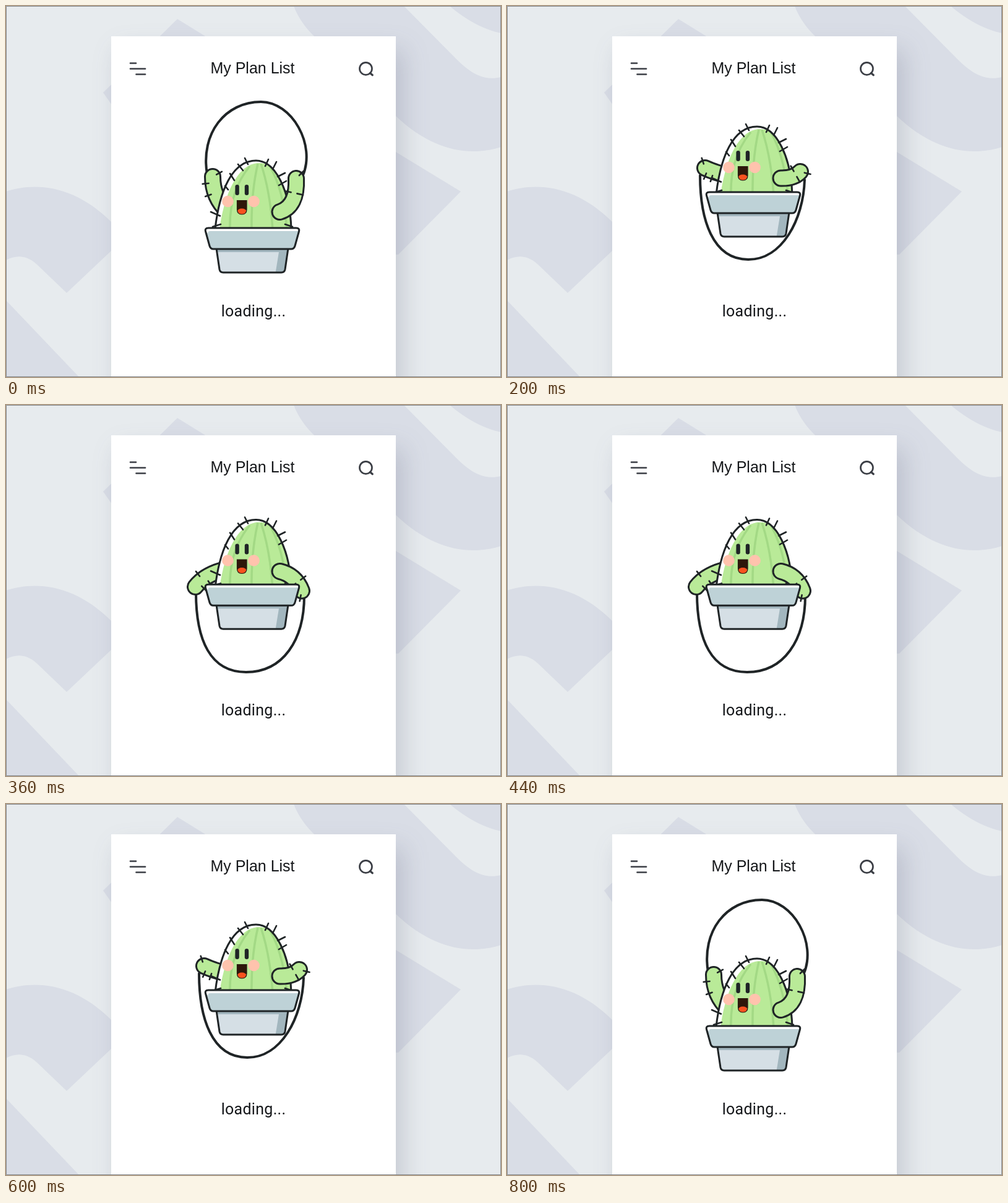
These frames come from a looping animation (800x600 px, 0.84 s). An HTML page:

```html
<!DOCTYPE html>
<html lang="en">
<head>
<meta charset="utf-8">
<title>Loading</title>
<style>
  html, body { margin: 0; width: 100%; height: 100%; overflow: hidden; }
  svg { display: block; width: 800px; height: 600px; background: #e7ebee; }
  .card { fill: #fff; filter: drop-shadow(12px 22px 20px rgba(65, 72, 98, .2)); }
  .line { fill: none; stroke: #1f2426; stroke-width: 3; stroke-linecap: round; stroke-linejoin: round; }
  .spine { stroke-width: 2.6; }
  .rope { stroke-width: 4; }
  .icon { fill: none; stroke: #3b3e45; stroke-width: 2.7; stroke-linecap: round; }
  .limb { fill: none; stroke-linecap: round; }
  .skin { stroke: #b9ea98; stroke-width: 22; }
  .edge { stroke: #1f2426; stroke-width: 28; }
  .rib { fill: none; stroke: #a3d985; stroke-width: 3.5; }
  text { text-anchor: middle; fill: #15171a; }
</style>
</head>
<body>
<svg viewBox="0 0 800 600">
  <defs>
    <clipPath id="bodyClip"><path d="M338 360C345 300 365 250 404 250C436 250 459 300 461 360Z"/></clipPath>
    <clipPath id="baseClip"><path d="M340 392L345 426Q346 431 351 431H445Q450 431 451 426L456 392Z"/></clipPath>
    <clipPath id="mouthClip"><path id="mouthShape" d="M373.5 314.5H389V329Q389 337 381.2 337Q373.5 337 373.5 329Z"/></clipPath>
  </defs>

  <g fill="#d9dde6">
    <path d="M157 140L277 21L340 60V160H171Z"/>
    <path d="M465 0Q475 27 500 51L630 178C690 235 750 244 800 228V115C772 122 750 108 728 86L643 0Z"/>
    <path d="M717 0C738 18 765 36 800 44V0Z"/>
    <path d="M625 233L735 300L634 402H625Z"/>
    <path d="M0 300C50 284 112 291 171 350V395L98 464L50 418C32 402 16 403 0 411Z"/>
    <path d="M0 476L118 600H0Z"/>
  </g>
  <rect class="card" x="170" y="49" width="460" height="600"/>
  <path class="icon" d="M201 92.5H210M201 101.5H225M210.5 110.5H225"/>
  <circle class="icon" cx="581.5" cy="101.3" r="10"/>
  <path class="icon" style="stroke-width:3.2" d="M588.5 108.5L592.3 111.8"/>
  <text x="398.5" y="109" font-size="25" font-family="'Liberation Sans', Arial, sans-serif">My Plan List</text>
  <text x="400" y="501.5" font-size="25" letter-spacing=".3" font-family="Roboto, sans-serif">loading...</text>

  <path id="ropeBack" class="line rope"/>
  <g id="leftArm"></g>

  <g id="body">
    <g clip-path="url(#bodyClip)">
      <path fill="#fff" d="M330 240H470V362H330Z"/>
      <path fill="#b9ea98" d="M345 362C351 312 372 254 409 254C440 254 462 290 470 362Z"/>
      <path class="rib" d="M394 259Q360 300 362 362M407 255Q396 302 397 362M412 255Q427 300 431 362M427 260Q449 300 454 362"/>
    </g>
    <path class="line" d="M338 360C345 300 365 250 404 250C436 250 459 300 461 360"/>
    <path class="line spine" d="M386 246L391 256M375 256L383 266M362 271L369 282M354 291L359 297M331 333L346 339.5M334 357L347 353
      M424 248L419 259M437 252L431 264M451 270L439 276M453 283L441 290M451 353L463 357"/>
    <g fill="#ffc3ad"><circle cx="358.5" cy="316" r="9.3"/><circle cx="400.5" cy="316" r="9.3"/></g>
    <g fill="#1f2426">
      <rect class="eye" x="370.4" width="6.4" rx="3.2"/>
      <rect class="eye" x="385.8" width="6.4" rx="3.2"/>
    </g>
    <use href="#mouthShape" fill="#2e170a"/>
    <ellipse cx="381.2" cy="332.5" rx="7.5" ry="5" fill="#f8521f" clip-path="url(#mouthClip)"/>
    <use href="#mouthShape" fill="none" stroke="#2a1c14" stroke-width="1.2"/>
  </g>

  <g id="rightArm"></g>

  <g id="pot">
    <g clip-path="url(#baseClip)">
      <path fill="#d5dfe5" d="M335 390H460V435H335Z"/>
      <path fill="#a2b6be" d="M335 390H460V435H435L441 398H335Z"/>
    </g>
    <path class="line" d="M340 392L345 426Q346 431 351 431H445Q450 431 451 426L456 392"/>
    <path id="rim" fill="#bed2d7" d="M327 359H469Q475 359 473.5 364.5L467 388Q465.500 393 461 393H335Q330.500 393 329 388L322.500 364.500Q321 359 327 359Z"/>
    <path fill="#fff" d="M325 359.500H471L472 364H330Q326 364 326.500 368L323 364Z"/>
    <use href="#rim" class="line" style="fill-opacity:0"/>
  </g>
  <path id="ropeFront" class="line rope"/>
  <path fill="none" stroke="#85898d" d="M.5 .5H799.500V599.500H.5Z"/>
</svg>
<script>
const LOOP = 840, STEP = 40, JUMP = 800;
const $ = id => document.getElementById(id);

// The jump is symmetric about its peak, so poses cover the rise only.
const TIMES = [0, 120, 200, 280, 360, 440, 520];
const LIFT = [[0, 0], [45.5, 45], [58, 55], [65, 62.5], [68.7, 64.5]]; // pot, body

// tip, control, shoulder, position of the spine at the hand
const LEFT = [
  [334, 276, 334, 310, 358, 332, -.1],
  [327, 248, 334, 278, 360, 294, -.15],
  [320, 262, 335, 269, 360, 275, -.15],
  [312, 279, 325, 269, 356, 266, .1],
  [306, 294, 322, 273, 358, 265, .3]
];
const RIGHT = [
  [469, 279, 471, 324, 442.5, 333, -.15],
  [471, 252, 470, 283, 442.5, 287, 0],
  [474, 268, 464, 279, 442.5, 278.5, -.1],
  [477, 286.5, 465, 271, 442.5, 271, -.15],
  [478, 300.5, 468, 275, 442.5, 269, -.2]
];

// start, control, control x, middle, control x, control, end
const ROPE = [
  [325, 272, 314, 205, 355, 412, 155, 462, 502, 225, 479, 276],
  [321, 250, 325, 310, 355, 398, 353, 440, 474, 318, 476, 252],
  [312, 274, 312, 345, 332, 390, 410, 445, 479, 345, 481, 281],
  [306, 288, 306, 370, 327, 388, 429, 448, 481, 370, 481, 296],
  [307, 303, 307, 380, 330, 388, 432, 448, 482, 380, 482, 308]
];

// Smooth curve through the poses; past the last one they run backwards.
function pose(keys, u) {
  const key = i => keys[i > 4 ? 9 - i : i];
  let i = 0;
  while (u >= TIMES[i + 1]) i++;
  const span = TIMES[i + 1] - TIMES[i], s = (u - TIMES[i]) / span;
  const slope = (j, k) => j
    ? (key(j + 1)[k] - key(j - 1)[k]) / (TIMES[j + 1] - TIMES[j - 1])
    : 1.2 * (key(1)[k] - key(0)[k]) / TIMES[1];
  return key(i).map((a, k) => {
    const b = key(i + 1)[k];
    return a + (b - a) * s * s * (3 - 2 * s)
      + span * s * (1 - s) * (slope(i, k) * (1 - s) - slope(i + 1, k) * s);
  });
}

// A tick across the limb's edge; a negative s goes around the round hand.
function spine([x0, y0, x1, y1, x2, y2], s, side, offset = 12) {
  const q = Math.max(s, 0), p = 1 - q;
  const x = p * p * x0 + 2 * p * q * x1 + q * q * x2;
  const y = p * p * y0 + 2 * p * q * y1 + q * q * y2;
  const along = Math.atan2(p * (y1 - y0) + q * (y2 - y1), p * (x1 - x0) + q * (x2 - x1));
  const angle = along - side * (Math.PI / 2 - Math.min(s, 0) * 5);
  const c = Math.cos(angle), n = Math.sin(angle), a = offset - 5, b = offset + 5;
  return `M${x + a * c} ${y + a * n}L${x + b * c} ${y + b * n}`;
}

function makeArm(id, keys, spines) {
  const group = $(id);
  group.innerHTML = '<path class="limb edge"/><path class="limb skin"/><path class="line spine"/>';
  const [edge, skin, ticks] = group.children;
  return u => {
    const p = pose(keys, u);
    const d = `M${p[0]} ${p[1]}Q${p.slice(2, 6)}`;
    edge.setAttribute('d', d);
    skin.setAttribute('d', d);
    ticks.setAttribute('d', spine(p, p[6], 1) + spines.map(a => spine(p, ...a)).join(''));
  };
}

const arms = [
  makeArm('leftArm', LEFT, [[.15, -1], [.42, -1]]),
  makeArm('rightArm', RIGHT, [[.3, 1, 8], [.3, -1]])
];
const eyes = document.querySelectorAll('.eye');

function draw(t) {
  const u = Math.min(t, JUMP - t);
  const [pot, body] = pose(LIFT, u);
  $('pot').setAttribute('transform', `translate(0 ${-pot})`);
  $('body').setAttribute('transform', `translate(0 ${-body})`);
  arms.forEach(arm => arm(u));

  const [x0, y0, ax, ay, bx, mx, my, cx, dx, dy, x1, y1] = pose(ROPE, u);
  const d = `M${x0} ${y0}C${ax} ${ay} ${bx} ${my} ${mx} ${my}C${cx} ${my} ${dx} ${dy} ${x1} ${y1}`;
  const inFront = t > 0 && t < 200;
  $('ropeFront').setAttribute('d', inFront ? d : '');
  $('ropeBack').setAttribute('d', inFront ? '' : d);

  const height = 6.4 + 10.6 * Math.min(1, Math.abs(t - 120) / 80);
  eyes.forEach(eye => {
    eye.setAttribute('height', height);
    eye.setAttribute('y', 297.5 - height / 2);
  });
}

function tick() {
  draw(Math.floor(performance.now() % LOOP / STEP) * STEP);
  requestAnimationFrame(tick);
}
tick();
</script>
</body>
</html>
```
